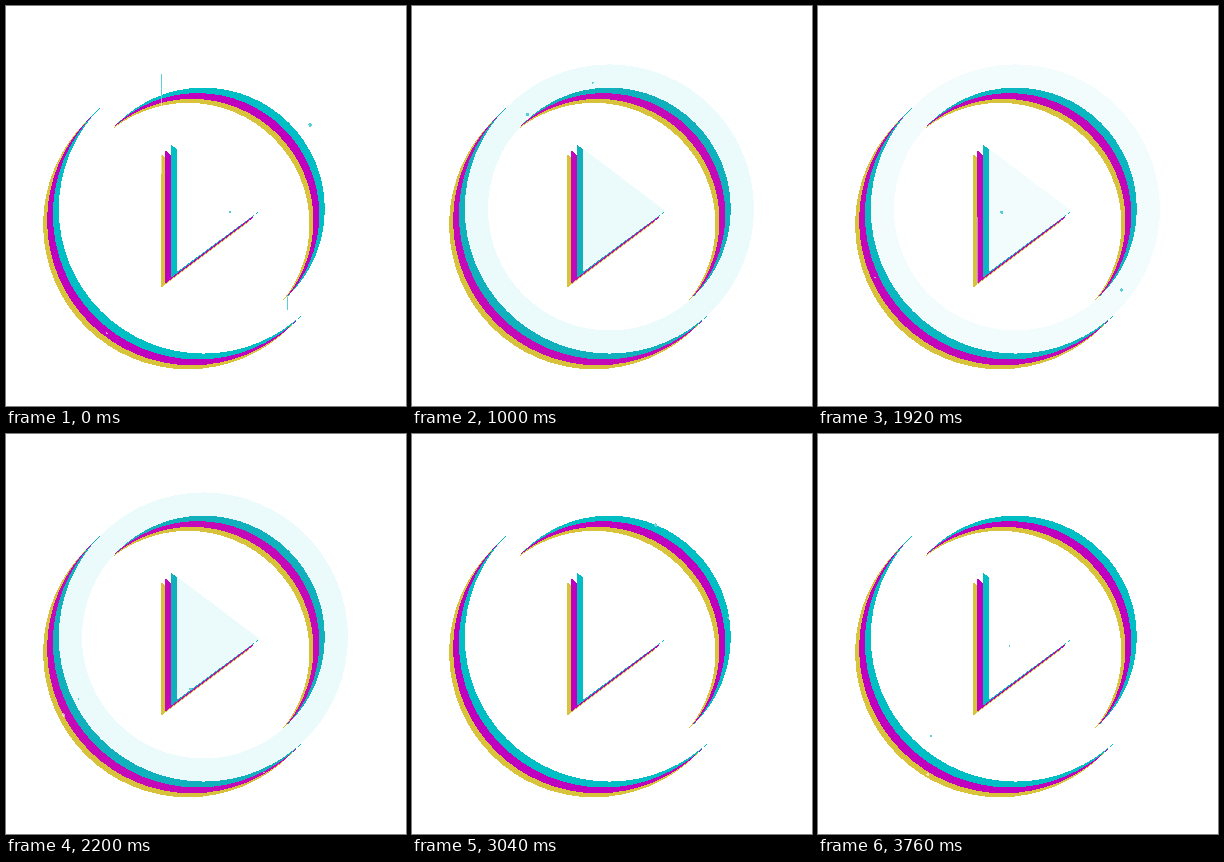
An HTML page for the animation above (3.8 s loop, 400 by 400 pixels).

```html
<!DOCTYPE html>
<html lang="en">
<head>
<meta charset="utf-8">
<title>Play button</title>
<style>
  html, body { margin: 0; width: 100%; height: 100%; overflow: hidden; background: #fff; }
  svg { display: block; width: 400px; height: 400px; shape-rendering: crispEdges; }
  path { fill-rule: evenodd; clip-rule: evenodd; }
  .dust { fill-rule: nonzero; fill-opacity: .75; }
</style>
</head>
<body>
<svg id="stage" viewBox="0 0 400 400"></svg>
<script>
const LOOP = 3800, STEP = 40;
const svg = document.getElementById('stage');

function add(parent, tag, attrs) {
  const el = document.createElementNS('http://www.w3.org/2000/svg', tag);
  for (const name in attrs) el.setAttribute(name, attrs[name]);
  return parent.appendChild(el);
}

const oval = (x, y, rx, ry = rx) =>
  `M${x - rx} ${y}a${rx} ${ry} 0 1 0 ${2 * rx} 0a${rx} ${ry} 0 1 0 ${-2 * rx} 0z`;

const polygon = points => `M${points.join('L')}z`;

const mix = (a, b, u) => `rgb(${a.map((v, i) => Math.round(v + (b[i] - v) * u))})`;

function ring(shift, grow) {
  const x = 197.4 - shift, y = 203 + shift;
  return oval(x, y, 144.6 + grow) + oval(x, y, 121.4 + grow);
}

// Ring and triangle pushed down the diagonal
const extrude = shift => ring(shift, .2) + polygon(
  [[170.7, 133], [258.7, 200], [170.7, 266]].map(([x, y]) => [x - shift, y + shift]));

const face = ring(0, 0) + polygon([[170.8, 142.5], [253.5, 205], [170.8, 266]]);

// Bottom to top, with the calm and the tinted colour and the colour of the dust
const layers = [
  [extrude(15.5), [217, 195, 58], [216, 194, 60], '#fff6c8'],
  [extrude(11.5), [191, 0, 191], [196, 10, 184], '#f3c4f0'],
  [extrude(5.7), [0, 191, 196], [16, 177, 188], '#7fe0e4'],
  [face, [255, 255, 255], [235, 250, 251], '#22bfc8']
].map(([d, calm, lit, color], i) => {
  const clip = add(svg, 'clipPath', { id: 'clip' + i });
  add(clip, 'path', { d });
  return {
    calm, lit,
    shape: add(svg, 'path', { d }),
    dust: add(svg, 'path', { class: 'dust', fill: color, 'clip-path': `url(#clip${i})` })
  };
});

function seeded(seed) {
  let s = seed * 7919 + 97;
  return () => {
    s = (s + 0x6D2B79F5) | 0;
    let v = Math.imul(s ^ s >>> 15, s | 1);
    v ^= v + Math.imul(v ^ v >>> 7, v | 61);
    return ((v ^ v >>> 14) >>> 0) / 4294967296;
  };
}

// The tint swells and fades three times: [time, level]
const swell = [[0, 0], [1000, 1], [1560, 0], [2200, 1], [3040, 0], [3400, .6], [3760, 0]];

function tintAt(time, rnd) {
  const i = Math.max(1, swell.findIndex(([t]) => t >= time));
  const [t0, a] = swell[i - 1], [t1, b] = swell[i];
  const level = a + (b - a) * (time - t0) / (t1 - t0);
  return level + (rnd() - .5) * level * (1 - level);
}

// Film dust: specks, now and then a scratch or a stain made of specks
function dustFrom(rnd) {
  const between = (a, b) => a + rnd() * (b - a);
  const speck = (x, y, size) => oval(x, y, size, size * between(.8, 1.4));
  let d = '';
  for (let n = between(4, 9); n > 1; n--)
    d += speck(between(40, 340), between(60, 362), between(.6, 1.7));
  for (let n = between(0, 2.4); n > 1; n--) {
    const top = between(50, 250);
    d += `M${Math.floor(between(45, 335))} ${top}h1v${between(30, 200)}h-1z`;
  }
  if (rnd() < .08) {
    const x = between(60, 330), y = between(70, 340), r = between(4, 9);
    for (let a = 0; a < 6; a += .4)
      d += speck(x + Math.cos(a) * r * .8, y + Math.sin(a) * r * 1.5, between(.4, 1.1));
  }
  return d;
}

function draw(step) {
  const rnd = seeded(step + 1);
  const level = tintAt(step && (step + 1) * STEP, rnd);
  const d = dustFrom(rnd);
  for (const { shape, dust, calm, lit } of layers) {
    shape.setAttribute('fill', mix(calm, lit, level));
    dust.setAttribute('d', d);
  }
}

let start, shown = 0;
function tick(now) {
  start ??= now;
  const time = Math.max(0, now - start) % LOOP;
  const step = Math.max(0, Math.floor(time / STEP) - 1);
  if (step !== shown) draw(shown = step);
  requestAnimationFrame(tick);
}
draw(0);
requestAnimationFrame(tick);
</script>
</body>
</html>
```
